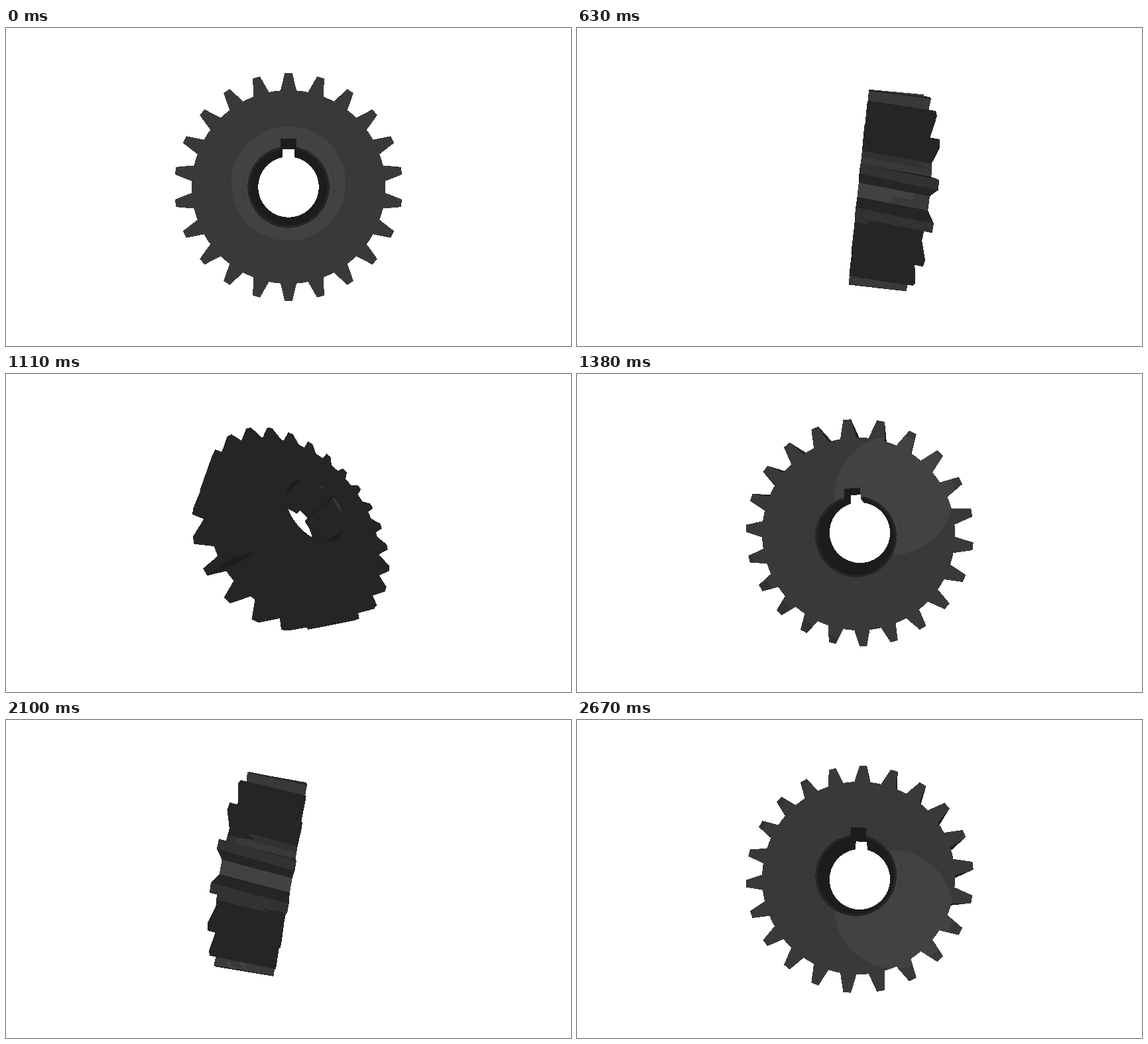
An HTML page with a canvas for the animation above (2700 ms loop, 852 px wide and 480 px high).

```html
<!DOCTYPE html>
<html lang="en">
<head>
<meta charset="utf-8">
<title>Rotating gear</title>
<style>
  html, body { margin: 0; width: 100%; height: 100%; overflow: hidden; background: #fff; }
  canvas { display: block; width: 852px; height: 480px; }
</style>
</head>
<body>
<canvas id="stage" width="852" height="480"></canvas>
<script>
const W = 852, H = 480, LOOP = 2700, STEP = 30;
const RAD = Math.PI / 180;
const FOCAL = H / 2 / Math.tan(37.5 * RAD);

// Gear dimensions; the tip radius is 1 and the back plane lies at z = 0.
const CAM = 2.328, DEPTH = 0.513, TEETH = 22, ROOT = 0.848, TWIST = 3 * RAD;
const BORE = 0.34, RIM = 0.358, BEVEL = 0.015, KEY = 0.07, KEY_TOP = 0.425;
const SLICES = 4, ARC = 96;

const ctx = document.getElementById('stage').getContext('2d');
const image = ctx.createImageData(W, H);
const pixels = new Uint32Array(image.data.buffer);
const zbuf = new Float32Array(W * H);

const gray = v => (0xff000000 | v << 16 | v << 8 | v) >>> 0;
const [DARK, BASE, MID, LIGHT, GLOSS] = [0x1c, 0x25, 0x32, 0x39, 0x42].map(gray);
const LINE = gray(0x2e);

const polar = (r, a, z) => [r * Math.cos(a), r * Math.sin(a), z];
const tris = [];
const tri = (a, b, c, kind) => tris.push({ p: [a, b, c], kind });
const quad = (a, b, c, d, kind) => { tri(a, b, c, kind); tri(a, c, d, kind); };

function outline(z) {
  const turn = TWIST * (z / DEPTH - 1), pts = [];
  for (let k = 0; k < TEETH; k++) {
    const mid = Math.PI / 2 + k * 2 * Math.PI / TEETH + turn;
    for (const [r, deg] of [[ROOT, -4.7], [1, -1.9], [1, 1.9], [ROOT, 4.7], [ROOT, 180 / TEETH]])
      pts.push(polar(r, mid + deg * RAD, z));
  }
  return pts;
}

// Circle around the bore, open where the keyway cuts it.
function openRing(r, z) {
  const gap = Math.asin(KEY / r), span = (2 * Math.PI - 2 * gap) / ARC;
  return Array.from({ length: ARC + 1 }, (_, i) => polar(r, Math.PI / 2 + gap + i * span, z));
}

function band(a, b) {
  for (let i = 0; i + 1 < a.length; i++) quad(a[i], a[i + 1], b[i + 1], b[i], 'wall');
}

function buildGear() {
  for (let s = 0; s < SLICES; s++) {
    const a = outline(DEPTH * s / SLICES), b = outline(DEPTH * (s + 1) / SLICES);
    a.forEach((p, i) => {
      const j = (i + 1) % a.length;
      quad(p, a[j], b[j], b[i], i % 5 === 1 ? 'tip' : 'wall');
    });
  }

  const front = outline(DEPTH);
  front.forEach((p, i) => tri([0, 0, DEPTH], p, front[(i + 1) % front.length], 'face'));

  const inner = openRing(BORE, DEPTH - BEVEL);
  band(openRing(BORE, 0), inner);
  band(inner, openRing(RIM, DEPTH));

  const low = Math.sqrt(BORE * BORE - KEY * KEY);
  const slot = [[-KEY, low], [-KEY, KEY_TOP], [KEY, KEY_TOP], [KEY, low]];
  band(slot.map(p => [...p, 0]), slot.map(p => [...p, DEPTH]));
}

// Spin about z first, then y, then x, all by the same angle.
function rotate([x, y, z], c, s) {
  const x1 = c * x - s * y, y1 = s * x + c * y;
  const x2 = c * x1 + s * z, z2 = c * z - s * x1;
  return [x2, c * y1 - s * z2, s * y1 + c * z2];
}

const sub = (a, b) => [a[0] - b[0], a[1] - b[1], a[2] - b[2]];
const dot = (a, b) => a[0] * b[0] + a[1] * b[1] + a[2] * b[2];

function normal(a, b, c) {
  const u = sub(b, a), v = sub(c, a);
  const n = [u[1] * v[2] - u[2] * v[1], u[2] * v[0] - u[0] * v[2], u[0] * v[1] - u[1] * v[0]];
  const len = Math.hypot(...n) || 1;
  const side = dot(n, sub([0, 0, CAM], a)) < 0 ? -1 : 1;
  return n.map(q => q * side / len);
}

// Distant light just above the camera, shaded in a few flat tones.
function makeShader(n, kind) {
  const up = 0.016, facing = n[1] * up + n[2];
  if (facing < 0.2) return () => DARK;
  const rx = 2.16 * facing * n[0], ry = 2.16 * facing * n[1] - up;
  const rz = 2 * facing * n[2] - 1, len = Math.hypot(rx, ry, rz);
  return (sx, sy) => {
    const glow = (rz - rx * sx - ry * sy) / (len * Math.sqrt(1 + sx * sx + sy * sy));
    if (glow < 0.7) return BASE;
    if (kind === 'tip' || glow < 0.777) return MID;
    return glow > 0.964 ? GLOSS : LIGHT;
  };
}

function fill({ p, kind }, c, s, axes) {
  const v = p.map(q => rotate(q, c, s));
  const q = v.map(([x, y, z]) => {
    const w = 1 / (CAM - z);
    return [W / 2 + x * FOCAL * w, H / 2 - y * FOCAL * w, w];
  });
  const [a, b, d] = q;
  const area = (b[0] - a[0]) * (d[1] - a[1]) - (b[1] - a[1]) * (d[0] - a[0]);
  if (Math.abs(area) < 1e-6) return;
  const shade = makeShader(normal(...v), kind);
  const xs = q.map(t => t[0]), ys = q.map(t => t[1]);
  const x0 = Math.max(0, Math.ceil(Math.min(...xs) - 0.5));
  const x1 = Math.min(W - 1, Math.floor(Math.max(...xs) - 0.5));
  const y0 = Math.max(0, Math.ceil(Math.min(...ys) - 0.5));
  const y1 = Math.min(H - 1, Math.floor(Math.max(...ys) - 0.5));

  for (let y = y0; y <= y1; y++) {
    const py = y + 0.5;
    for (let x = x0; x <= x1; x++) {
      const px = x + 0.5;
      const k1 = ((px - a[0]) * (d[1] - a[1]) - (py - a[1]) * (d[0] - a[0])) / area;
      const k2 = ((b[0] - a[0]) * (py - a[1]) - (b[1] - a[1]) * (px - a[0])) / area;
      if (k1 < 0 || k2 < 0 || k1 + k2 > 1) continue;
      const w = a[2] + k1 * (b[2] - a[2]) + k2 * (d[2] - a[2]);
      const at = y * W + x;
      if (w <= zbuf[at]) continue;
      const sx = (px - W / 2) / FOCAL, sy = (H / 2 - py) / FOCAL;
      let tone = shade(sx, sy);
      if (kind === 'face') {
        const pos = [sx / w, sy / w, CAM - 1 / w];
        const lx = dot(pos, axes[0]), ly = dot(pos, axes[1]), r = Math.hypot(lx, ly);
        if (r < RIM * 0.999 || (Math.abs(lx) < KEY && ly > 0 && ly < KEY_TOP)) continue;
        // faint broken seam around the bore
        if (tone !== BASE && Math.abs(r - 0.4) < 0.0028 && Math.abs(lx) > 0.37 &&
            Math.sin(Math.atan2(ly, lx) * 60) > 0.1) tone = LINE;
      }
      zbuf[at] = w;
      pixels[at] = tone;
    }
  }
}

function draw(angle) {
  const c = Math.cos(angle), s = Math.sin(angle);
  const axes = [rotate([1, 0, 0], c, s), rotate([0, 1, 0], c, s)];
  pixels.fill(0xffffffff);
  zbuf.fill(0);
  for (const t of tris) fill(t, c, s, axes);
  ctx.putImageData(image, 0, 0);
}

buildGear();
const start = performance.now();
let shown = -1;
function tick() {
  const step = Math.floor(((performance.now() - start) % LOOP) / STEP);
  if (step !== shown) {
    shown = step;
    draw(step * STEP / LOOP * 2 * Math.PI);
  }
  requestAnimationFrame(tick);
}
tick();
</script>
</body>
</html>
```
